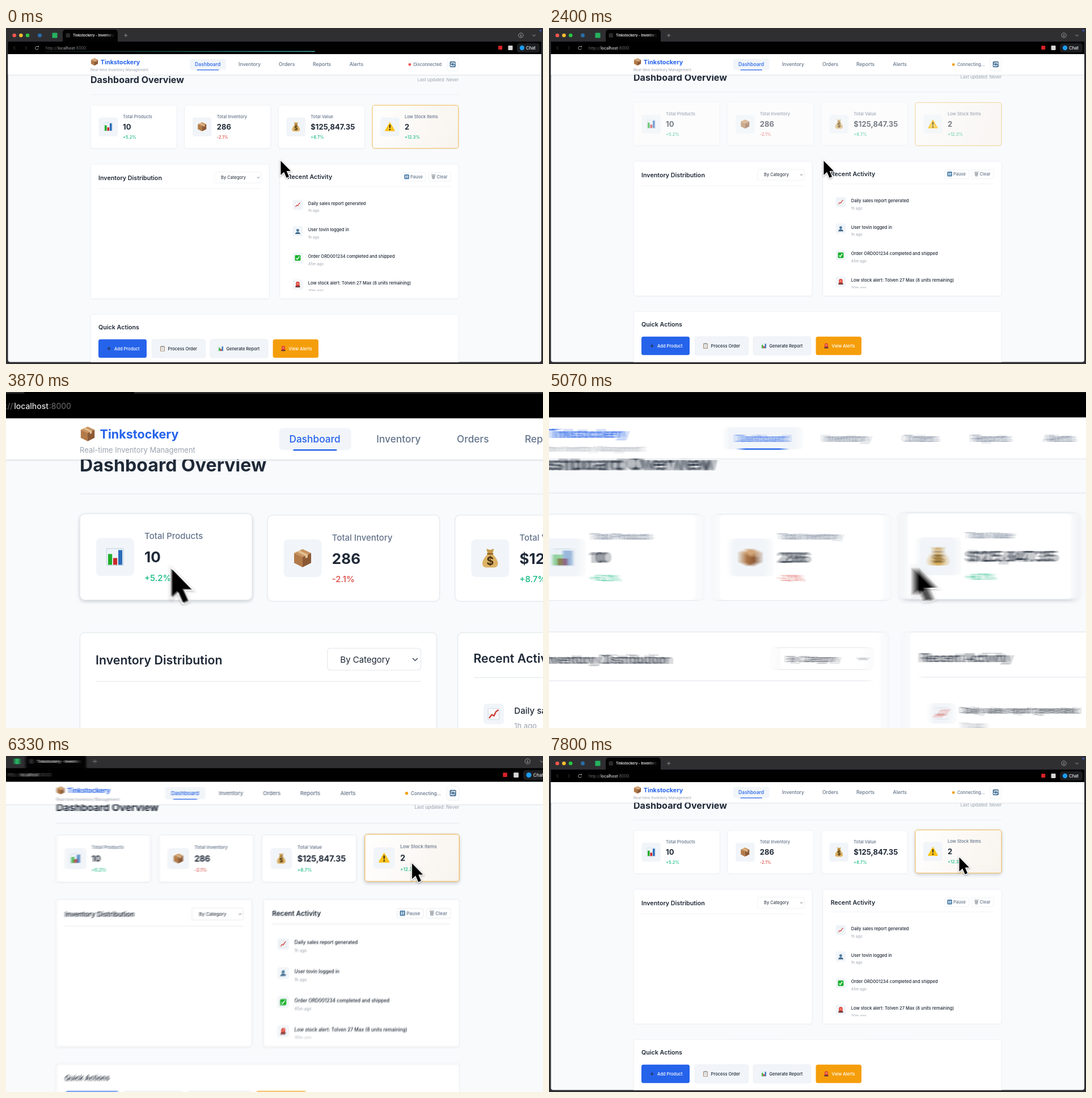
Recreate the animation shown at these times as an HTML page with a canvas. Size 947x592 px, loop 7.87 s.

```html
<!DOCTYPE html>
<html lang="en">
<head>
<meta charset="utf-8">
<title>Inventory dashboard</title>
<style>
  html, body { margin: 0; width: 100%; height: 100%; overflow: hidden; background: #000; }
  canvas { display: block; width: 947px; height: 592px; }
</style>
</head>
<body>
<canvas id="stage" width="947" height="592"></canvas>
<script>
const W = 947, H = 592, LOOP = 7870, STEP = 1000 / 15, SHUTTER = 22, SAMPLES = 10;
const out = document.getElementById('stage').getContext('2d');
const buffer = document.createElement('canvas');
buffer.width = W;
buffer.height = H;
const c = buffer.getContext('2d');

const INK = '#1f2937', GREY = '#64748b', PALE = '#9ca3af', LINE = '#e5e9ee';
const BLUE = '#2563eb', AMBER = '#f59e0b', SOFT = '#f1f5f9', GREEN = '#10b981', RED = '#dc4a41';
const RELOADED = 1320;

// ---------- motion ----------
const clamp = v => Math.max(0, Math.min(1, v));
const smooth = (t, a, b) => { const u = clamp((t - a) / (b - a)); return u * u * (3 - 2 * u); };
const spring = (t, start) => {
  const x = Math.max(0, t - start) * 0.00578;
  return 1 - (1 + x) * Math.exp(-x);
};

function camera(t) {
  const zoom = spring(t, 2480) - spring(t, 5650);
  const pan = smooth(t, 4720, 5600);
  const fx = 168 + 491 * pan + 125 * smooth(t, 5650, 6300);
  const fy = 45.5 + 5 * pan;
  return { s: 1 + zoom, x: -fx * zoom, y: -fy * zoom };
}

// time, x, y
const path = [
  [0, 484.5, 234], [2500, 484.5, 234], [3700, 212, 166], [3870, 230.5, 179],
  [4050, 250, 187], [4700, 485, 180], [5070, 491, 178], [5350, 590, 181],
  [5600, 608.5, 181], [5720, 608.5, 181], [6230, 721, 177], [6700, 723.5, 178.5], [8000, 723.5, 178.5]
];

function slope(i, k) {
  if (i < 1 || i > path.length - 2) return 0;
  const d = j => (path[j + 1][k] - path[j][k]) / (path[j + 1][0] - path[j][0]);
  const a = d(i - 1), b = d(i);
  return a * b <= 0 ? 0 : 2 * a * b / (a + b);
}

function pointer(t) {
  t = Math.max(0, t);
  let i = 0;
  while (i < path.length - 2 && t >= path[i + 1][0]) i++;
  const p = path[i], q = path[i + 1], d = q[0] - p[0], u = (t - p[0]) / d;
  return [1, 2].map(k => {
    const e = u * u * (3 - 2 * u);
    return p[k] + (q[k] - p[k]) * e
      + d * slope(i, k) * u * (1 - u) * (1 - u)
      - d * slope(i + 1, k) * u * u * (1 - u);
  });
}

// share of the last 200 ms that the pointer spent on a card
function hover(x, t) {
  let n = 0;
  for (let k = 0; k < 10; k++) {
    const [px, py] = pointer(t - k * 20);
    if (px > x && px < x + 152 && py > 131 && py < 207) n++;
  }
  return n / 10;
}

// ---------- drawing helpers ----------
function text(str, x, y, size, color, weight = 400) {
  c.font = `${weight} ${size}px Inter, "Liberation Sans", sans-serif`;
  c.fillStyle = color;
  c.fillText(str, x, y + size * 0.364);
}

function box(x, y, w, h, r, fill, stroke, lw = 0.6) {
  c.beginPath();
  c.roundRect(x, y, w, h, r);
  if (fill) { c.fillStyle = fill; c.fill(); }
  if (stroke) { c.strokeStyle = stroke; c.lineWidth = lw; c.stroke(); }
}

function dot(x, y, r, fill) {
  c.beginPath();
  c.arc(x, y, r, 0, 7);
  c.fillStyle = fill;
  c.fill();
}

function trace(pts) {
  c.beginPath();
  for (let i = 0; i < pts.length; i += 2) c.lineTo(pts[i], pts[i + 1]);
}

function poly(fill, ...pts) {
  trace(pts);
  c.closePath();
  c.fillStyle = fill;
  c.fill();
}

function line(color, lw, ...pts) {
  trace(pts);
  c.strokeStyle = color;
  c.lineWidth = lw;
  c.stroke();
}

function shadow(color, blur, dy, draw) {
  c.save();
  c.shadowColor = color;
  c.shadowBlur = blur;
  c.shadowOffsetY = dy;
  draw();
  c.restore();
}

// ---------- icons, drawn in a box from -8 to 8 ----------
const icons = {
  bars() {
    box(-7.5, -7.5, 15, 15, 1, '#edf3f8', '#c9d8e4');
    box(-6.2, -2.5, 3.6, 9.5, 0, '#1fae2b');
    box(-1.7, 1, 3.6, 6, 0, '#c92a2a');
    box(2.8, -6, 3.6, 13, 0, '#2b6cb8');
  },
  parcel() {
    poly('#c9935f', 0, -8, 7.5, -4.5, 0, -1, -7.5, -4.5);
    poly('#b27a48', -7.5, -4.5, 0, -1, 0, 8, -7.5, 4.2);
    poly('#8c5935', 7.5, -4.5, 0, -1, 0, 8, 7.5, 4.2);
    poly('#e3c094', -5, -5.8, -2.8, -6.8, 4.6, -3.2, 4.6, -0.8, 2.4, 0.2, 2.4, -2);
  },
  bag() {
    poly('#c79a4a', -3.2, -8, 0, -7, 3.2, -8, 2, -3.6, -2, -3.6);
    c.beginPath();
    c.moveTo(-2, -3.5);
    c.bezierCurveTo(-8, 2, -8, 8, -3, 8);
    c.lineTo(3, 8);
    c.bezierCurveTo(8, 8, 8, 2, 2, -3.5);
    c.fillStyle = '#dcb266';
    c.fill();
    line('#8a6026', 1.2, -2.6, -3.6, 2.6, -3.6);
    text('$', -3.1, 2.4, 9.5, '#4a3312', 700);
  },
  warn() {
    c.lineJoin = 'round';
    poly('#fcc21b', 0, -6.5, 7.5, 6.5, -7.5, 6.5);
    c.strokeStyle = '#fcc21b';
    c.lineWidth = 2;
    c.stroke();
    poly('#2f2a26', -1.2, -3.5, 1.2, -3.5, 0.7, 2.3, -0.7, 2.3);
    dot(0, 4.7, 1.2, '#2f2a26');
  },
  trend() {
    box(-7.5, -7.5, 15, 15, 1, '#f6f8fa', '#cdd6de');
    line('#d8dfe6', 0.6, -7, 0, 7, 0);
    line('#d0342c', 1.7, -6, 5.5, -2.5, 1, 0.5, 2.5, 3, -3, 6.5, -5.5);
  },
  user() {
    dot(0, -3, 3.8, '#4f7ea0');
    c.beginPath();
    c.ellipse(0, 7, 7, 5.5, 0, Math.PI, 0);
    c.fillStyle = '#3f6a8c';
    c.fill();
  },
  check() {
    box(-7.5, -7.5, 15, 15, 2, '#18b22c');
    line('#fff', 2.2, -4.2, 0.4, -1.3, 3.6, 4.2, -4);
  },
  siren() {
    box(-4.8, -7.5, 9.6, 11.5, [3.5, 3.5, 0, 0], '#dc3b31');
    box(-2.6, -4.5, 5.2, 5, 2, '#f58b78');
    box(-6.2, 3.5, 12.4, 4, 1, '#6d3a3a');
  },
  pause() {
    box(-7.5, -7.5, 15, 15, 2, '#4d80ab');
    box(-3.8, -4, 2.6, 8, 0, '#fff');
    box(1.2, -4, 2.6, 8, 0, '#fff');
  },
  cycle() {
    box(-7.5, -7.5, 15, 15, 2.5, '#557d9f');
    c.strokeStyle = '#fff';
    c.lineWidth = 1.7;
    for (const a of [3.4, 0.26]) {
      c.beginPath();
      c.arc(0, 0, 4.2, a, a + 2.3);
      c.stroke();
    }
    poly('#fff', 2, -1.6, 6, -1.6, 5, -5.4);
    poly('#fff', -2, 1.6, -6, 1.6, -5, 5.4);
  },
  bin() {
    line('#7f868c', 1.5, -6.8, -6.2, 6.8, -6.2);
    poly('#cfd4d8', -5.8, -5, 5.8, -5, 4.4, 7.5, -4.4, 7.5);
    for (const x of [-3.5, 0, 3.5]) line('#83898f', 1, x, -5, x * 0.8, 7);
    line('#83898f', 1, -5.2, 0, 5.2, 0);
  },
  clip() {
    box(-6.5, -7, 13, 15, 1, '#9b7552');
    box(-5, -5, 10, 11.5, 0, '#f3f5f6');
    box(-3, -8, 6, 3, 1, '#8d969c');
    for (const y of [-2.5, 0.3, 3.1]) line('#a5afb8', 0.9, -3.5, y, 3.5, y);
  },
  plus() {
    line('#27324d', 2, -5.5, 0, 5.5, 0);
    line('#27324d', 2, 0, -5.5, 0, 5.5);
  }
};

function icon(name, x, y, size) {
  c.save();
  c.translate(x, y);
  c.scale(size / 16, size / 16);
  icons[name]();
  c.restore();
}

// ---------- scene ----------
function chrome(t) {
  const bar = '#6f6f72';
  c.fillStyle = '#2f2f32';
  c.fillRect(0, 0, W, H);
  box(100, 3, 97, 26, 5, '#030303');
  c.fillStyle = '#000';
  c.fillRect(3.5, 24, 940.5, 24);

  ['#f5574f', '#f6bd30', '#2cc642'].forEach((col, i) => dot(14.7 + i * 11.7, 13, 3.3, col));
  dot(59.5, 13, 3.5, '#2b6da8');
  box(81.5, 8.5, 9, 9, 1, '#26b25f');
  box(105.5, 9.3, 7.5, 7.5, 1.5, '#2b2b2d');
  const fade = c.createLinearGradient(176, 0, 191, 0);
  fade.addColorStop(0, '#f0f0f0');
  fade.addColorStop(1, 'rgba(240,240,240,0)');
  text('Tinkstockery - Inventory', 118, 13, 6.1, fade, 600);
  line('#a0a0a2', 0.8, 208, 13, 214.4, 13);
  line('#a0a0a2', 0.8, 211.2, 9.8, 211.2, 16.2);
  c.beginPath();
  c.arc(908, 13, 4.2, 0, 7);
  c.strokeStyle = '#b0b0b2';
  c.lineWidth = 0.8;
  c.stroke();
  line('#b0b0b2', 0.8, 908, 10.8, 908, 15);
  line('#b0b0b2', 0.8, 906.3, 13.4, 908, 15.1, 909.7, 13.4);
  line('#b0b0b2', 0.9, 928.2, 11.8, 931, 14.4, 933.8, 11.8);
  dot(942.5, 4.5, 1.6, '#3f5fd0');

  line('#4c4c4e', 0.9, 16.4, 32, 13.4, 35, 16.4, 38);
  line('#4c4c4e', 0.9, 33.6, 32, 36.6, 35, 33.6, 38);
  c.beginPath();
  c.arc(54.5, 35.2, 2.9, 0.3, 5.4);
  c.strokeStyle = '#b5b5b7';
  c.lineWidth = 0.9;
  c.stroke();
  poly('#b5b5b7', 55.4, 33.6, 58, 33.8, 57.8, 31);
  text('http://', 70, 35, 7, bar);
  text('localhost', 91, 35, 7, t < 800 ? '#a2a2a4' : '#e6e6e8', 500);
  text(':8000', 121.8, 35, 7, bar);
  if (t < 800) {
    const end = 545 + 395 * smooth(t, 0, 780);
    const g = c.createLinearGradient(70, 0, end, 0);
    g.addColorStop(0, 'rgba(50,150,150,.15)');
    g.addColorStop(1, '#45b3b0');
    c.fillStyle = g;
    c.fillRect(70, 40.6, end - 70, 1.4);
  }
  box(868.2, 31.2, 7, 7, 1, '#d8232a');
  box(885.5, 31, 8, 8, 1, '#d6d6d6');
  box(901, 27, 40, 16, 4, '#1c1d20');
  dot(910, 35, 4.2, '#1d9bf0');
  text('Chat', 917, 35, 7.5, '#f2f2f2', 500);
}

function header(t) {
  const ready = t >= RELOADED, dx = ready ? 0 : -0.9;
  shadow('rgba(15,23,42,.16)', 3, 0.8, () => {
    c.fillStyle = '#fff';
    c.fillRect(0, 40, W, 42.3);
  });
  icon('parcel', 156, 59.7, 13);
  text('Tinkstockery', 166.8, 60, 10.8, BLUE, 700);
  text('Real-time Inventory Management', 149, 73.8, 6.5, PALE);
  box(325 + dx, 54.5, 63.7, 19.6, 3.5, SOFT);
  box(337.5 + dx, 73.3, 38.5, 1.2, 0.5, BLUE);
  const nav = { Dashboard: 334, Inventory: 411, Orders: 482, Reports: 542, Alerts: 606.6 };
  for (const name in nav) {
    text(name, nav[name] + dx, 64.3, 8.66, name === 'Dashboard' ? BLUE : GREY, 500);
  }
  dot(ready ? 713.2 : 712, 64.3, 2.4, ready ? AMBER : '#ef5350');
  text(ready ? 'Connecting...' : 'Disconnected', ready ? 720 : 718.4, 64.3, 7.57, GREY, 500);
  box(777.8, 53.2, 20, 22.3, 3.5, '#fff', LINE);
  icon('cycle', 787.8, 64, 11);
}

const cards = [
  ['bars', 'Total Products', '10', '+5.2%'],
  ['parcel', 'Total Inventory', '286', '-2.1%'],
  ['bag', 'Total Value', '$125,847.35', '+8.7%'],
  ['warn', 'Low Stock Items', '2', '+12.3%']
];

function card([name, label, value, change], i, t) {
  const x = 149.2 + i * 165.6, up = hover(x, t), y = 131.3, last = i === 3;
  let fill = '#fff';
  if (last) {
    fill = c.createLinearGradient(x, y, x + 152, y + 76);
    fill.addColorStop(0, '#fff');
    fill.addColorStop(1, '#f8f3ed');
  }
  c.save();
  c.translate(0, -1.1 * up);
  c.globalAlpha = t < RELOADED ? 1 : 0.6 + 0.4 * smooth(t, 2420, 2720);
  shadow(`rgba(15,23,42,${0.06 + 0.16 * up})`, 2 + 4 * up, 0.6 + 1.6 * up,
    () => box(x, y, 152, 76, 4.2, '#fff'));
  box(x, y, 152, 76, 4.2, fill, last ? '#efb03c' : LINE, last ? 0.9 : 0.6);
  box(x + 14.2, y + 21.4, 33.6, 33.4, 4.2, SOFT);
  icon(name, x + 31, y + 38, name === 'bag' || name === 'warn' ? 16.5 : 16);
  text(label, x + 56.9, y + 19.7, 7.5, GREY, 500);
  text(value, x + 56.9, y + 38.2, 13.05, INK, 700);
  text(change, x + 56.9, y + 56.3, 7.5, change[0] === '-' ? RED : GREEN, 500);
  c.restore();
}

function panel(x, y, w, h) {
  shadow('rgba(15,23,42,.06)', 2, 0.6, () => box(x, y, w, h, 4.2, '#fff'));
  box(x, y, w, h, 4.2, '#fff', LINE);
}

const events = [
  ['trend', 'Daily sales report generated', '1h ago'],
  ['user', 'User tovin logged in', '1h ago'],
  ['check', 'Order ORD001234 completed and shipped', '45m ago'],
  ['siren', 'Low stock alert: Tolven 27 Max (8 units remaining)', '30m ago']
];

// icon, label, left, width, icon centre, label left, fill, ink
const actions = [
  ['plus', 'Add Product', 163, 85, 181.5, 191, BLUE, '#fff'],
  ['clip', 'Process Order', 257.3, 94.2, 276, 285.6, SOFT, INK],
  ['bars', 'Generate Report', 360, 102, 379, 388.4, SOFT, INK],
  ['siren', 'View Alerts', 470.6, 80.4, 489, 498.6, AMBER, '#fff']
];

function content(t) {
  text('Dashboard Overview', 149, 86.8, 16.1, INK, 700);
  c.textAlign = 'right';
  text('Last updated: Never', 798, 86.3, 7.57, PALE);
  c.textAlign = 'left';
  line(LINE, 0.6, 149, 112.7, 798, 112.7);
  cards.forEach((item, i) => card(item, i, t));

  panel(149.2, 235, 315, 237);
  text('Inventory Distribution', 163, 259, 10.7, INK, 600);
  box(367.7, 248.8, 82.5, 19.4, 3, '#fff', LINE);
  text('By Category', 379, 258.7, 7.5, INK);
  line('#4b5563', 0.8, 443, 257.6, 445.2, 259.7, 447.4, 257.6);
  line(LINE, 0.6, 163, 278, 450.3, 278);

  panel(482.8, 235, 315.2, 237);
  text('Recent Activity', 496.7, 257.6, 10.7, INK, 600);
  box(698, 249.7, 42, 15.5, 2.2, '#fff', LINE);
  icon('pause', 706.6, 257.3, 9);
  text('Pause', 713, 257.5, 7.5, GREY, 500);
  box(745.2, 249.7, 39, 15.5, 2.2, '#fff', LINE);
  icon('bin', 753.8, 257.3, 9);
  text('Clear', 759.6, 257.5, 7.5, GREY, 500);
  line(LINE, 0.6, 496.7, 274.8, 784.3, 274.8);

  c.save();
  c.beginPath();
  c.rect(496, 278, 290, 180.6);
  c.clip();
  events.forEach(([name, label, ago], i) => {
    const y = 304.1 + i * 46.8;
    box(505.5, y - 6.4, 18, 18, 3, SOFT);
    icon(name, 514.5, y + 2.7, 10.5);
    text(label, 532.7, y, 7.57, INK, 500);
    text(ago, 532.7, y + 13.2, 6.5, PALE);
  });
  c.restore();

  panel(149.2, 499.6, 648.8, 120);
  text('Quick Actions', 163, 522.2, 10.7, INK, 600);
  for (const [name, label, x, w, ix, tx, fill, ink] of actions) {
    box(x, 543.8, w, 32.4, 3.5, fill, fill === SOFT ? LINE : null);
    icon(name, ix, 560, 9.5);
    text(label, tx, 560, 7.5, ink, 500);
  }
}

function arrow(t) {
  const [x, y] = pointer(t);
  c.save();
  c.translate(x, y);
  trace([0, 0, 0, 25, 5.7, 19.8, 10.2, 30, 14.6, 28, 10.2, 18, 17.6, 18]);
  c.closePath();
  c.lineJoin = 'miter';
  c.strokeStyle = '#fff';
  c.lineWidth = 2.6;
  shadow('rgba(0,0,0,.35)', 3, 1, () => c.stroke());
  c.fillStyle = '#000';
  c.fill();
  c.restore();
}

function scene(t, at) {
  const cam = camera(at);
  c.setTransform(cam.s, 0, 0, cam.s, cam.x, cam.y);
  chrome(t);
  c.save();
  c.beginPath();
  c.roundRect(3.5, 46, 940.5, 542.5, [0, 0, 4, 4]);
  c.clip();
  c.fillStyle = '#f8fafc';
  c.fillRect(0, 46, W, H);
  c.save();
  c.translate(0, t < RELOADED ? 4.8 : 0);
  content(t);
  c.restore();
  header(t);
  c.restore();
  arrow(at);
}

// motion blur: average several moments inside the shutter time
function render(t) {
  const pose = at => { const v = camera(at); return [v.s * 600, v.x, v.y, ...pointer(at)]; };
  const a = pose(t - SHUTTER / 2), b = pose(t + SHUTTER / 2);
  const moving = a.some((v, i) => Math.abs(v - b[i]) > 0.4);
  const n = moving ? SAMPLES : 1;
  for (let i = 0; i < n; i++) {
    scene(t, moving ? t + SHUTTER * ((i + 0.5) / n - 0.5) : t);
    out.globalAlpha = 1 / (i + 1);
    out.drawImage(buffer, 0, 0);
  }
}

const begin = performance.now();
let shown = -1;
function tick() {
  const t = (performance.now() - begin) % LOOP;
  const frame = Math.min(117, Math.floor((t + 5) / STEP));
  if (frame !== shown) {
    shown = frame;
    render(frame * STEP);
  }
  requestAnimationFrame(tick);
}
tick();
</script>
</body>
</html>
```
